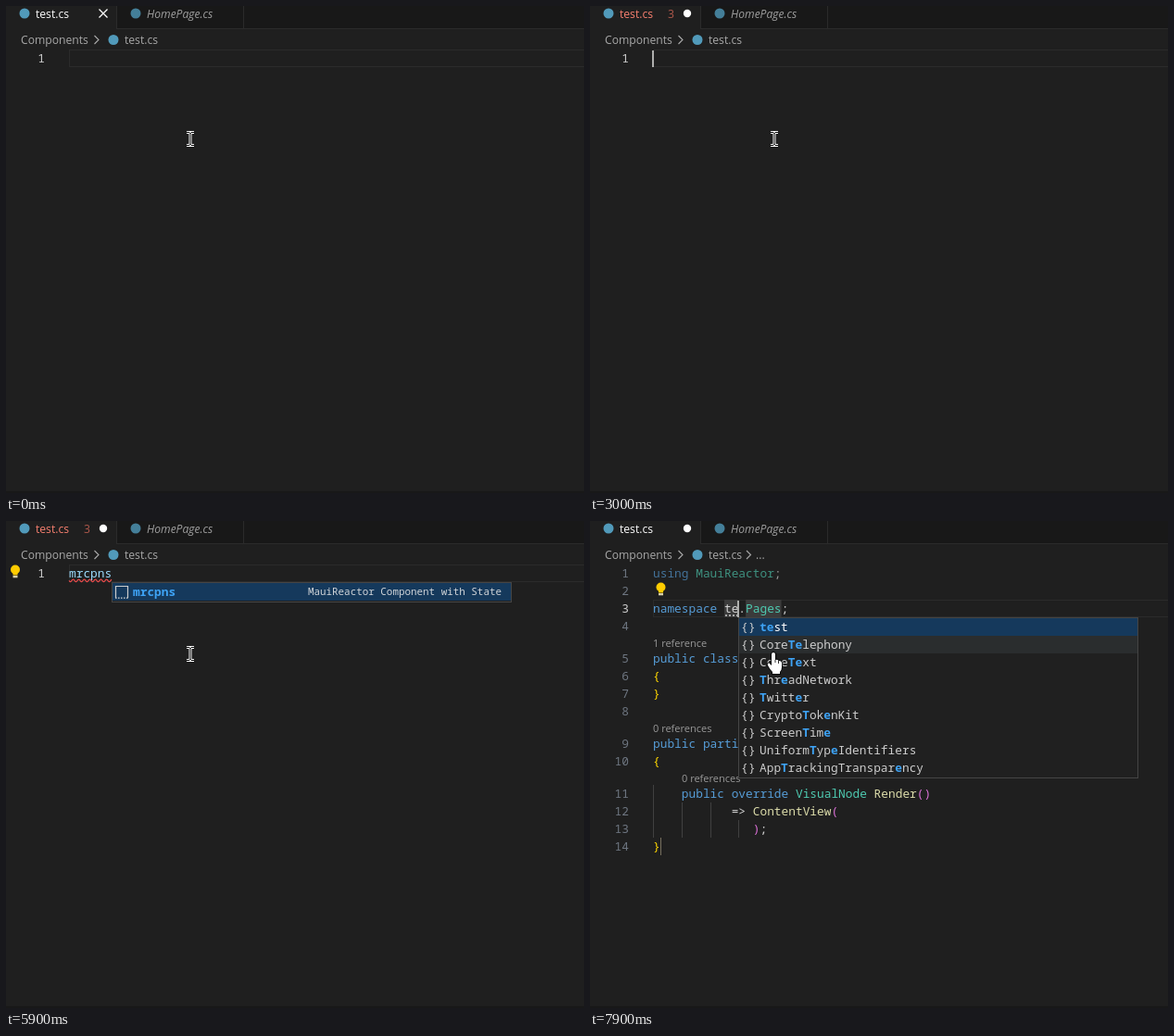
An HTML page with a canvas that plays this animation: 624 px wide and 526 px high, repeating every 8000 ms.

```html
<!DOCTYPE html>
<html lang="en">
<head>
<meta charset="utf-8">
<title>Snippet demo</title>
<style>
html, body { margin: 0; width: 100%; height: 100%; overflow: hidden; background: #1f1f1f; }
canvas { display: block; width: 624px; height: 526px; }
</style>
</head>
<body>
<canvas id="stage"></canvas>
<script>
const W = 624, H = 526, LOOP = 8000;
const CH = 7.697, ROW = 19, LEFT = 68, TOP = 47;
const MONO = '"Noto Sans Mono", "DejaVu Sans Mono", monospace';
const UI = '"Open Sans", "Noto Sans", sans-serif';
const CODE = '12.83px ' + MONO;
const COLORS = { k: '#569cd6', t: '#4ec9b0', w: '#d4d4d4', f: '#dcdcaa', y: '#ffd700', m: '#da70d6', v: '#9cdcfe' };

const canvas = document.getElementById('stage');
const ctx = canvas.getContext('2d');
const dpr = window.devicePixelRatio || 1;
canvas.width = W * dpr;
canvas.height = H * dpr;

// icon, label with matched letters between asterisks, detail
const snippets = [
  ['box', '*mr*cp', 'MauiReactor Component only'],
  ['box', '*mr*cpns', 'MauiReactor Component with State'],
  ['box', '*mr*inject', 'inject field'],
  ['box', '*mr*param', 'Parameter field'],
  ['box', '*mr*prop', 'Prop field'],
  ['ns', '*M*aui*R*eactor', ''],
  ['cls', '*M*aui*R*efreshView', 'Microsoft.Maui.Platform'],
  ['cls', '*M*idi*R*awData', 'AudioToolbox'],
  ['cls', '*M*idi*R*eceiveBlock', 'CoreMidi'],
  ['struct', '*M*KMap*R*ect', 'MapKit'],
  ['cls', '*MX*App*R*esponsivenessMetric', 'MetricKit'],
  ['cls', '*MX*App*R*unTimeMetric', 'MetricKit']
];
const chosen = [['box', '*mrcpns*', 'MauiReactor Component with State']];
const spaces = ['*te*st', 'Core*Te*lephony', 'Core*Te*xt', '*T*hr*e*adNetwork', '*T*witt*e*r',
  'Crypto*T*ok*e*nKit', 'Screen*T*im*e*', 'Uniform*T*yp*e*Identifiers', 'App*T*rackingTranspar*e*ncy'
].map(s => ['ns', s, '']);

// each entry changes the editor from its time on
const steps = [
  [0, { text: '', caret: 0, dirty: 0, errors: 0, wave: 0, bulb: 0, list: null, code: 0 }],
  [400, { caret: 1 }],
  [900, { caret: 0 }],
  [1000, { text: 'c', caret: 1, dirty: 1 }],
  [1100, { text: 'cp' }],
  [1300, { text: 'cpn' }],
  [1400, { errors: 1, wave: 1 }],
  [1800, { caret: 0 }],
  [2000, { text: 'cp', caret: 1 }],
  [2100, { text: 'c' }],
  [2200, { text: '' }],
  [2300, { text: 'r' }],
  [2400, { text: 'rm', list: snippets, col: 2 }],
  [2500, { text: 'r', list: null }],
  [2700, { list: snippets, col: 1, bulb: 1 }],
  [3000, { text: '', list: null, bulb: 0 }],
  [3100, { text: 'm' }],
  [3300, { text: 'mr' }],
  [3800, { caret: 0 }],
  [3900, { bulb: 1 }],
  [4100, { caret: 1, bulb: 0, list: snippets, col: 2 }],
  [4400, { caret: 0, bulb: 1 }],
  [4900, { text: 'mrc', caret: 1, bulb: 0 }],
  [5000, { text: 'mrcp' }],
  [5200, { text: 'mrcpn' }],
  [5400, { text: 'mrcpns' }],
  [5700, { list: chosen, col: 6 }],
  [5900, { caret: 0, bulb: 1 }],
  [6300, { code: 1, name: 'YourProject', caret: 1, list: null, bulb: 0, errors: 0, lens: 0, gap: 0, dim: 0 }],
  [6500, { gap: 16, dim: 1 }],
  [6600, { bulb: 1 }],
  [6800, { caret: 0 }],
  [7100, { lens: 1 }],
  [7300, { caret: 1 }],
  [7700, { name: 't' }],
  [7800, { name: 'te' }],
  [7900, { list: spaces, col: 12 }]
];

function stateAt(t) {
  const s = {};
  for (const [at, change] of steps) if (at <= t) Object.assign(s, change);
  return s;
}

function rect(x, y, w, h, color) {
  ctx.fillStyle = color;
  ctx.fillRect(x, y, w, h);
}

function frame(x, y, w, h, color) {
  ctx.strokeStyle = color;
  ctx.lineWidth = 1;
  ctx.strokeRect(x + .5, y + .5, w - 1, h - 1);
}

function write(str, x, y, color, font, align = 'left') {
  ctx.font = font;
  ctx.fillStyle = color;
  ctx.textAlign = align;
  ctx.fillText(str, x, y);
}

function line(points, color, width) {
  ctx.beginPath();
  points.forEach(([x, y], i) => i ? ctx.lineTo(x, y) : ctx.moveTo(x, y));
  ctx.strokeStyle = color;
  ctx.lineWidth = width;
  ctx.stroke();
}

function disc(x, y, r, color) {
  ctx.beginPath();
  ctx.arc(x, y, r, 0, 7);
  ctx.fillStyle = color;
  ctx.fill();
}

const ui = (str, x, y, color, style = '') => write(str, x, y, color, style + '12.15px ' + UI);
const colX = n => LEFT + n * CH;
const chevron = x => line([[x, 32], [x + 4.5, 36.5], [x, 41]], '#a9a9a9', 1.1);

function chrome(s) {
  rect(0, 0, W, H, '#1f1f1f');
  rect(120, 0, W - 120, 24, '#181818');
  rect(119, 24, W - 119, 1, '#2b2b2b');
  rect(119, 0, 1, 24, '#2b2b2b');
  rect(256, 0, 1, 24, '#2b2b2b');
  rect(0, 524, W, 2, '#181818');
  disc(20, 8, 5.5, '#519aba');
  ui('test.cs', 32, 13, s.errors ? '#f88070' : '#ffffff');
  if (s.errors) ui('3', 84, 13, '#b0594c');
  if (s.dirty) disc(105, 8, 4.2, '#ffffff');
  else {
    line([[100.5, 3.5], [109.5, 12.5]], '#ffffff', 1.3);
    line([[109.5, 3.5], [100.5, 12.5]], '#ffffff', 1.3);
  }
  disc(140, 8, 5.5, '#447f99');
  ui('HomePage.cs', 152, 13, '#9d9d9d', 'italic ');
  ui('Components', 16, 41, '#a9a9a9');
  chevron(95.5);
  disc(116, 36.5, 5.5, '#519aba');
  ui('test.cs', 128, 41, '#a9a9a9');
  if (s.code && s.lens) {
    chevron(169);
    ui('...', 179, 41, '#a9a9a9');
  }
}

function activeRow(y) {
  frame(LEFT, y, W, ROW, '#2b2b2b');
}

function tokens(src, x, y) {
  for (const part of src.split('|')) {
    const str = part.slice(1);
    write(str, x, y, COLORS[part[0]], CODE);
    x += str.length * CH;
  }
}

function caret(x, y) {
  rect(Math.round(x) - 1, y + 1, 2, ROW - 1, '#aeafad');
}

function bulb(x, y) {
  disc(x, y - 1.5, 5, '#ffcc00');
  rect(x - 2.5, y + 1, 5, 3.5, '#ffcc00');
  rect(x - 2.5, y + 5, 5, 2.3, '#d8d0a8');
}

function wave(x0, x1, y) {
  const pts = [];
  for (let x = x0; x <= x1; x += .5) pts.push([x, y + 1.3 * Math.sin((x - x0) * Math.PI / 3)]);
  line(pts, '#f14c4c', 1.1);
}

function typedLine(s) {
  activeRow(TOP);
  write('1', 42, TOP + 14, '#cccccc', CODE, 'right');
  tokens('v' + s.text, LEFT, TOP + 14);
  const end = colX(s.text.length);
  if (s.wave && s.text) wave(LEFT, end, 64.3);
  if (s.bulb) bulb(10, 54);
  if (s.caret) caret(end, TOP);
}

const rowY = (n, s) => TOP + (n - 1) * ROW + s.gap * ((n > 4) + (n > 8) + (n > 10));

function codePage(s) {
  const src = [
    'kusing |tMauiReactor|w;', '',
    'knamespace |' + (s.name.length > 2 ? 't' : 'w') + s.name + '|w.|tPages|w;', '',
    'kpublic class |tMyComponentState', 'y{', 'y}', '',
    'kpublic partial class |tMyComponent|w : |tComponent|w<|tMyComponentState|w>', 'y{',
    'w    |kpublic override |tVisualNode |fRender|m()',
    'w           => |fContentView|m(',
    'w              |m)|w;', 'y}'
  ];
  const whole = s.name === 'YourProject';
  const y3 = rowY(3, s), end = 10 + s.name.length;
  const mark = (row, col, len, color = '#3b3b3b') => rect(colX(col), rowY(row, s), len * CH, ROW, color);
  if (!whole) activeRow(y3);
  mark(3, 10, s.name.length, whole ? '#405c79' : '#3b3b3b');
  mark(3, end + 1, 5);
  mark(5, 13, 11);
  mark(9, 21, 11);
  mark(9, 45, 11);
  [1, 3, 4].forEach((count, i) => {
    for (let g = 0; g < count; g++) rect(Math.round(colX(g * 4)), rowY(11 + i, s), 1, ROW, '#404040');
  });
  src.forEach((str, i) => {
    const y = rowY(i + 1, s) + 14;
    write(i + 1, 42, y, i === 2 ? '#cccccc' : '#6e7681', CODE, 'right');
    ctx.globalAlpha = i === 0 && s.dim ? .667 : 1;
    if (str) tokens(str, LEFT, y);
    ctx.globalAlpha = 1;
  });
  rect(76, rowY(14, s), 1, ROW, '#77705f');
  const dots = whole ? 3 : s.name.length * 2;
  for (let i = 0; i < dots; i++) rect(146 + i * 4, y3 + 16, 2, 2, '#a8a8a8');
  if (s.lens) {
    const lens = (str, x, row) => write(str, x, rowY(row, s) - 3, '#999999', '11.03px ' + UI);
    lens('1 reference', LEFT, 5);
    lens('0 references', LEFT, 9);
    lens('0 references', 99, 11);
  }
  if (s.bulb) bulb(76.5, 73);
  if (s.caret) caret(colX(end), y3);
}

const icons = {
  box(x, y) {
    line([[x + .5, y + 13], [x + .5, y + .5], [x + 13.5, y + .5], [x + 13.5, y + 13]], '#cccccc', 1.2);
    for (let i = 0; i < 5; i++) rect(x + i * 3, y + 12.5, 1.6, 1.3, '#cccccc');
  },
  ns(x, y) {
    write('{', x - 1, y + 11, '#cccccc', CODE);
    write('}', x + 7, y + 11, '#cccccc', CODE);
  },
  cls(x, y) {
    const c = '#ee9d28';
    line([[x + .8, y + 4.5], [x + 4.5, y + .8], [x + 7, y + 3.3], [x + 3.3, y + 7], [x + .8, y + 4.5]], c, 1.2);
    line([[x + 6, y + 4.7], [x + 10, y + 4.7]], c, 1.2);
    line([[x + 7.5, y + 4.7], [x + 7.5, y + 10.5], [x + 10, y + 10.5]], c, 1.2);
    for (const d of [4.7, 10.5]) {
      line([[x + 9.5, y + d], [x + 11.7, y + d - 2.2], [x + 13.8, y + d], [x + 11.7, y + d + 2.2], [x + 9.5, y + d]], c, 1.2);
    }
  },
  struct(x, y) {
    frame(x, y + 1, 14, 5, '#cccccc');
    frame(x, y + 8, 5, 5, '#cccccc');
    frame(x + 9, y + 8, 5, 5, '#cccccc');
  }
};

function popup(s) {
  const x = Math.round(colX(s.col)), y = s.code ? 104 : 66, w = 432, h = s.list.length * ROW + 3;
  rect(x, y, w, h, '#202020');
  s.list.forEach(([icon, label, detail], i) => {
    const top = y + 1 + i * ROW;
    if (!i) rect(x + 1, top, w - 2, ROW, '#15395c');
    else if (top === 124) rect(x + 1, top, w - 2, ROW, '#2a2d2e');
    icons[icon](x + 4, top + 3);
    let tx = x + 23;
    label.split('*').forEach((part, k) => {
      if (k % 2) write(part, tx, top + 14, '#3ea3f5', 'bold ' + CODE);
      else write(part, tx, top + 14, i ? '#cccccc' : '#ffffff', CODE);
      tx += part.length * CH;
    });
    write(detail, x + 421, top + 13, i ? '#949494' : '#d0d4d8', '10.9px ' + MONO, 'right');
  });
  if (s.list === snippets) rect(x + 421, y + 1, 10, ROW, 'rgba(121,121,121,.4)');
  frame(x, y, w, h, '#454545');
}

function beam() {
  const paths = [
    [[195, 136.5], [198, 136.5], [199, 137.5], [200, 136.5], [203, 136.5]],
    [[199, 137], [199, 150]],
    [[195, 150.5], [198, 150.5], [199, 149.5], [200, 150.5], [203, 150.5]]
  ];
  for (const p of paths) line(p, '#ffffff', 3);
  for (const p of paths) line(p, '#000000', 1);
}

function hand() {
  const p = new Path2D('M196 144q0-2 2-2t2 2v6q3-1 3.5 1q3-.5 3.5 2v5q0 3-2 5v2h-8v-2q-3-3-5-7q-1-3 1.5-2.5l2.5 2.5z');
  ctx.lineWidth = 1.6;
  ctx.strokeStyle = '#000000';
  ctx.stroke(p);
  ctx.fillStyle = '#ffffff';
  ctx.fill(p);
  line([[200, 150], [200, 153]], '#000000', .8);
  line([[203.5, 151], [203.5, 154]], '#000000', .8);
}

function draw(now) {
  const s = stateAt(now % LOOP);
  ctx.setTransform(dpr, 0, 0, dpr, 0, 0);
  chrome(s);
  (s.code ? codePage : typedLine)(s);
  if (s.list) popup(s);
  (s.list && s.list.length > 1 ? hand : beam)();
}

const start = performance.now();
function tick() {
  draw(performance.now() - start);
  requestAnimationFrame(tick);
}
tick();
</script>
</body>
</html>
```
